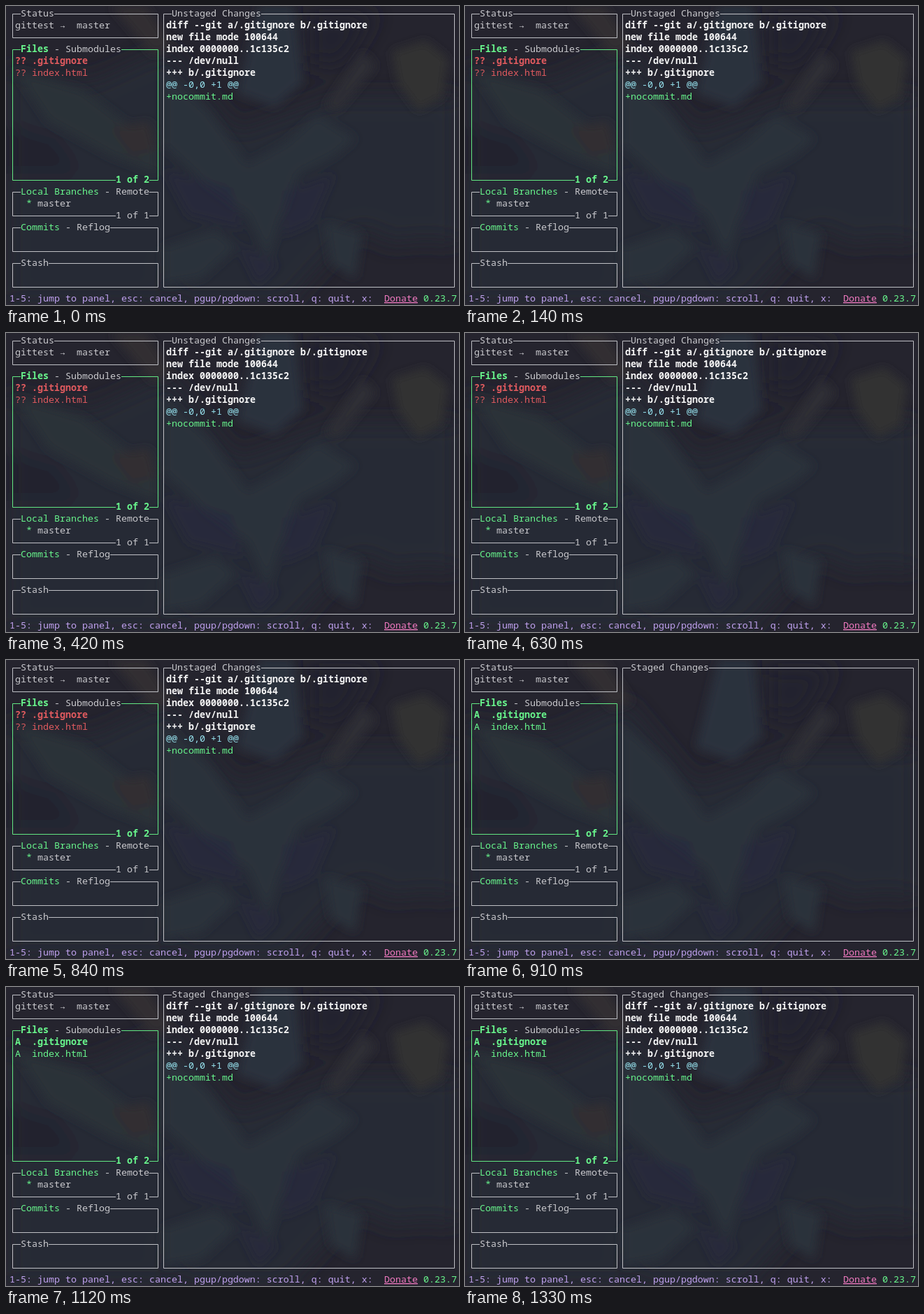
An HTML page for the animation above (1.4 s loop, 648 px wide and 428 px high).

```html
<!DOCTYPE html>
<html lang="en">
<head>
<meta charset="utf-8">
<title>Staging files</title>
<style>
  html, body { margin: 0; width: 100%; height: 100%; overflow: hidden; background: #25242e; }
  svg { display: block; width: 648px; height: 428px; }
  text {
    font: 13.333px "Noto Sans Mono", "DejaVu Sans Mono", monospace;
    white-space: pre;
    fill: #c9c9cd;
  }
  .lines path { fill: none; stroke: #bfc0c5; }
  .lines .active { stroke: #62e884; }
  .bold { font-weight: 700; }
  .white { fill: #f5f5f5; }
  .green { fill: #68f58c; }
  .red { fill: #df5a5e; }
  .cyan { fill: #98e4f0; }
  .purple { fill: #c0a2ef; }
  .pink { fill: #f07ac0; text-decoration: underline; }

  .before, .after, .diff { animation: 1400ms step-end infinite; }
  .before { animation-name: before; }
  .after { animation-name: after; }
  .diff { animation-name: diff; }
  @keyframes before { 0% { visibility: visible } 65%, 100% { visibility: hidden } }
  @keyframes after { 0% { visibility: hidden } 65%, 100% { visibility: visible } }
  @keyframes diff { 0% { visibility: visible } 65% { visibility: hidden } 70%, 100% { visibility: visible } }
</style>
</head>
<body>
<svg viewBox="0 0 648 428">
  <defs>
    <filter id="soft" x="-20%" y="-20%" width="140%" height="140%"><feGaussianBlur stdDeviation="7"/></filter>
    <filter id="softer" x="-40%" y="-40%" width="180%" height="180%"><feGaussianBlur stdDeviation="16"/></filter>
  </defs>

  <!-- Blurred wallpaper -->
  <rect width="648" height="428" fill="#25242e"/>
  <g filter="url(#softer)">
    <path fill="#272936" d="M0 90L120 110 230 60 330 180 470 130 648 130V340L500 320 400 428H250L200 300 0 260Z"/>
    <path fill="#272a36" d="M0 240L200 270 240 428H0ZM470 230L648 200V330L540 340Z"/>
    <path fill="#24242f" d="M0 170L70 190 110 240 0 240ZM430 10H530L480 90 430 80Z"/>
  </g>
  <g filter="url(#soft)">
    <path fill="#2a313c" d="M362 0H412L425 110 385 145 330 125Z"/>
    <path fill="#293039" d="M10 90L110 120 215 200 215 240 150 215 60 165Z"/>
    <path fill="#2a323b" d="M225 90L290 150 345 225 400 195 445 155 500 190 470 215 420 240 395 300 375 365 345 300 290 260 225 200Z"/>
    <path fill="#272740" opacity=".55" d="M225 235L320 260 340 320 260 300ZM400 265L470 240 440 310 395 330ZM330 340L390 370 360 400Z"/>
    <path fill="#2a303a" d="M455 310L510 325 500 390 465 370ZM225 345L300 320 330 345 280 390 225 400Z"/>
    <path fill="#302e32" d="M150 0H200L240 60 210 70ZM150 175L205 165 215 205 180 215Z"/>
    <path fill="#323233" d="M552 65L600 50 632 75 625 130 590 150 560 110Z"/>
    <path fill="#2d2f34" d="M510 65L530 85 475 150 455 145Z"/>
  </g>

  <g class="lines">
    <path d="M69 11.5H217.5V45.5H9.5V11.5H21"/>
    <path class="active" d="M165 62.5H217.5V249.5H205M157 249.5H9.5V62.5H21"/>
    <path d="M205 266.5H217.5V300.5H205M157 300.5H9.5V266.5H21"/>
    <path d="M149 317.5H217.5V351.5H9.5V317.5H21"/>
    <path d="M61 368.5H217.5V402.5H9.5V368.5H21"/>
    <path d="M365 11.5H641.5V402.5H225.5V11.5H237"/>
    <path class="after" d="M349 11.5H365"/>
  </g>

  <text x="21" y="15">Status</text>
  <text x="13" y="32">gittest</text>
  <text x="77" y="32">→</text>
  <text x="101" y="32">master</text>

  <text x="21" y="66"><tspan class="green bold">Files</tspan> - Submodules</text>
  <g class="before">
    <text class="red bold" x="13" y="83">?? .gitignore</text>
    <text class="red" x="13" y="100">?? index.html</text>
  </g>
  <g class="after">
    <text class="green bold" x="13" y="83">A  .gitignore</text>
    <text class="green" x="13" y="100">A  index.html</text>
  </g>
  <text class="green bold" x="157" y="253">1 of 2</text>

  <text x="21" y="270"><tspan class="green">Local Branches</tspan> - Remote</text>
  <text x="29" y="287"><tspan class="green">*</tspan> master</text>
  <text x="157" y="304">1 of 1</text>

  <text x="21" y="321"><tspan class="green">Commits</tspan> - Reflog</text>
  <text x="21" y="372">Stash</text>

  <text class="before" x="237" y="15">Unstaged Changes</text>
  <text class="after" x="237" y="15">Staged Changes</text>
  <g class="diff">
    <text class="white bold" x="229" y="32">diff --git a/.gitignore b/.gitignore</text>
    <text class="white bold" x="229" y="49">new file mode 100644</text>
    <text class="white bold" x="229" y="66">index 0000000..1c135c2</text>
    <text class="white bold" x="229" y="83">--- /dev/null</text>
    <text class="white bold" x="229" y="100">+++ b/.gitignore</text>
    <text class="cyan" x="229" y="117">@@ -0,0 +1 @@</text>
    <text class="green" x="229" y="134">+nocommit.md</text>
  </g>

  <text class="purple" x="5" y="423">1-5: jump to panel, esc: cancel, pgup/pgdown: scroll, q: quit, x:</text>
  <text class="pink" x="541" y="423">Donate</text>
  <text class="green" x="597" y="423">0.23.7</text>
</svg>
</body>
</html>
```
